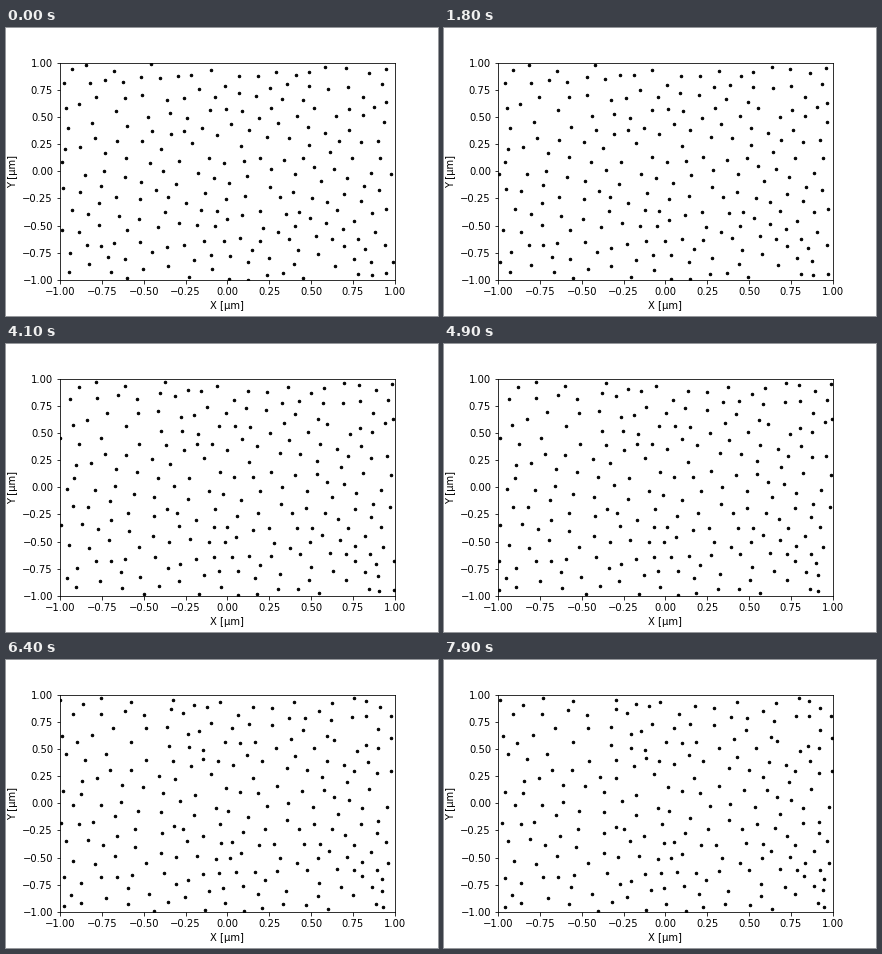
Write a matplotlib script that moves like this. It is 432x288 px and loops after 8 s.

```python
import numpy as np
import matplotlib.pyplot as plt
from matplotlib.animation import FuncAnimation

FRAMES, INTERVAL = 80, 100
COUNT = 222
BOX = np.array([334.8, 217.4])      # plot area in px

rng = np.random.default_rng(7)


def scatter(count, trials=80):
    """Evenly spread points: each one the loneliest of some random trials."""
    points = [rng.random(2) * BOX]
    while len(points) < count:
        trial = rng.random((trials, 2)) * BOX
        gap = np.abs(trial[:, None] - np.array(points))
        gap = np.minimum(gap, BOX - gap)        # periodic box
        nearest = np.hypot(gap[..., 0], gap[..., 1]).min(axis=1)
        points.append(trial[nearest.argmax()])
    return np.array(points)


def drift(points):
    """Displacement over one loop: rightward flow, uneven near the top."""
    px, py = (2 * np.pi * points / BOX).T
    dx = 21.5 - 4 * (1 + np.cos(py)) * np.cos(2 * px)
    flow = np.column_stack([dx, np.zeros_like(dx)])
    return flow + rng.normal(0, 2.3, points.shape)


start = scatter(COUNT)
move = drift(start)

fig, ax = plt.subplots(figsize=(6, 4), dpi=72, facecolor="white")
fig.subplots_adjust(left=0.125, right=0.9, bottom=0.125, top=0.88)
ax.set(xlim=(-1, 1), ylim=(-1, 1), xlabel="X [µm]", ylabel="Y [µm]")
dots, = ax.plot([], [], "k.", markersize=5)


def update(i):
    pos = (start + move * i / FRAMES) % BOX / BOX
    dots.set_data(2 * pos[:, 0] - 1, 1 - 2 * pos[:, 1])
    return dots,


anim = FuncAnimation(fig, update, frames=FRAMES, interval=INTERVAL,
                     repeat=True, repeat_delay=0)
plt.show()
```
